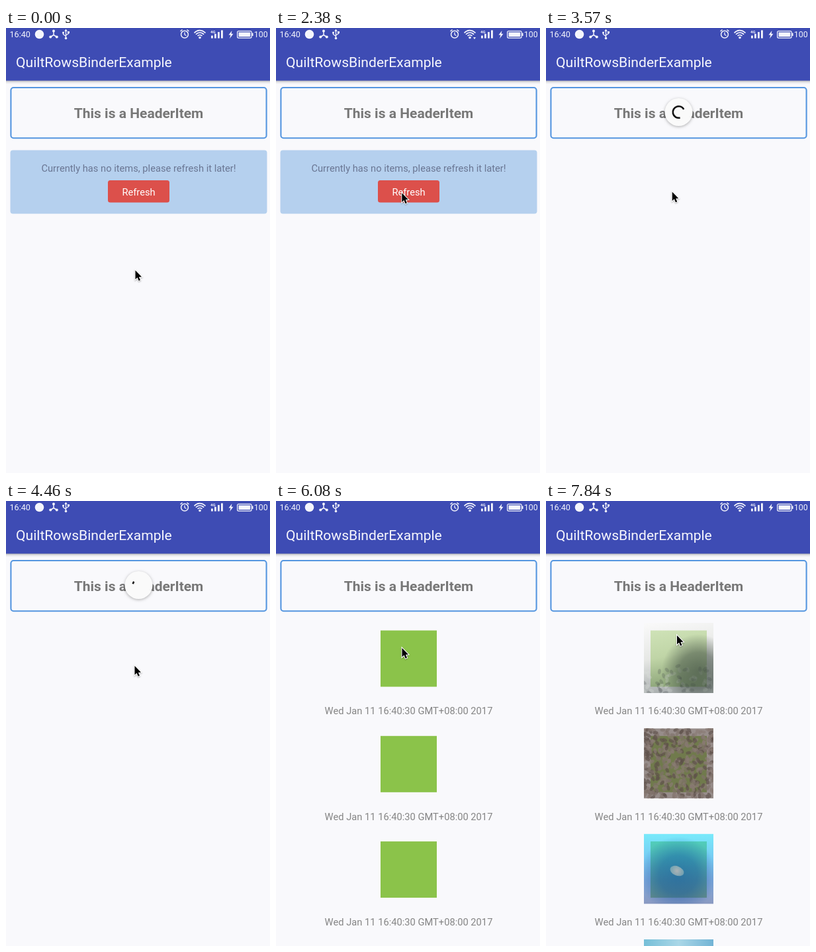
An HTML page with a canvas that plays this animation: 399x672 px, repeating every 7.99 s.

```html
<!DOCTYPE html>
<html lang="en">
<head>
<meta charset="utf-8">
<title>List refresh</title>
<style>
html, body { margin: 0; width: 100%; height: 100%; overflow: hidden; background: #f9f9fc; }
canvas { display: block; width: 399px; height: 672px; }
</style>
</head>
<body>
<canvas id="stage"></canvas>
<script>
const W = 399, H = 672, MID = 200.5;
const LOOP = 7990, TICK = 148, LAST_TICK = 53;
const canvas = document.getElementById('stage');
const ratio = window.devicePixelRatio || 1;
canvas.width = W * ratio;
canvas.height = H * ratio;
const c = canvas.getContext('2d');

// Pointer stops; it glides from one to the next.
const stops = [
  { t: 0, x: 195.5, y: 366 },
  { t: 1040, x: 166.5, y: 284 },
  { t: 1184, x: 176, y: 259 },
  { t: 1630, x: 192, y: 251 },
  { t: 2220, x: 192, y: 251 },
  { t: 2664, x: 187, y: 246 },
  { t: 4440, x: 194.5, y: 249 },
  { t: 5772, x: 190.5, y: 222 },
  { t: 6220, x: 190.5, y: 222 },
  { t: 6956, x: 198, y: 185 },
  { t: 7696, x: 199, y: 183 },
  { t: 7844, x: 198, y: 203 }
];

const clamp = v => Math.max(0, Math.min(1, v));
const ramp = (t, a, b) => clamp((t - a) / (b - a));
const mix = (a, b, k) => a + (b - a) * k;
const ease = v => v < 0.5 ? 4 * v * v * v : 1 - Math.pow(2 - 2 * v, 3) / 2;

function random(seed) {
  return () => (seed = (seed * 16807) % 2147483647) / 2147483647;
}

function text(str, x, y, size, color, align = 'left', weight = 400) {
  c.font = `${weight} ${size}px Roboto, sans-serif`;
  c.textAlign = align;
  c.fillStyle = color;
  c.fillText(str, x, y);
}

function rect(x, y, w, h, color) {
  c.fillStyle = color;
  c.fillRect(x, y, w, h);
}

function roundRect(x, y, w, h, r) {
  c.beginPath();
  c.roundRect(x, y, w, h, r);
}

function oval(x, y, rx, ry, angle, color) {
  c.fillStyle = color;
  c.beginPath();
  c.ellipse(x, y, rx, ry, angle, 0, Math.PI * 2);
  c.fill();
}

const disc = (x, y, r, color) => oval(x, y, r, r, 0, color);

function arc(x, y, r, from, to, width) {
  c.lineWidth = width;
  c.beginPath();
  c.arc(x, y, r, from, to);
  c.stroke();
}

function trace(points) {
  c.beginPath();
  points.forEach(([x, y]) => c.lineTo(x, y));
}

function line(points, width = 1.3) {
  c.lineWidth = width;
  trace(points);
  c.stroke();
}

function poly(points, color) {
  c.fillStyle = color;
  trace(points);
  c.fill();
}

function group(draw, alpha = 1) {
  if (alpha <= 0) return;
  c.save();
  c.globalAlpha = alpha;
  draw();
  c.restore();
}

function stopsOf(g, colors) {
  colors.forEach((color, i) => g.addColorStop(i / (colors.length - 1), color));
  return g;
}

const linear = (x0, y0, x1, y1, ...colors) =>
  stopsOf(c.createLinearGradient(x0, y0, x1, y1), colors);
const radial = (x, y, r, ...colors) =>
  stopsOf(c.createRadialGradient(x, y, 0, x, y, r), colors);

function shadow(alpha, blur, dy) {
  c.shadowColor = `rgba(0,0,0,${alpha})`;
  c.shadowBlur = blur * ratio;
  c.shadowOffsetY = dy * ratio;
}

function statusBar(t) {
  const white = '#f4f5fc';
  text('16:40', 5.5, 14, 12.6, white);
  disc(50.5, 9.5, 6.8, white);
  c.strokeStyle = white;

  // Three-node glyph
  for (let i = 0; i < 3; i++) {
    const a = (i * 2 / 3 - 0.5) * Math.PI;
    const x = 72 + 5.5 * Math.cos(a), y = 10.5 + 6 * Math.sin(a);
    line([[72, 10.5], [x, y]], 1.5);
    disc(x, y, 2, white);
  }

  // USB
  line([[90.5, 3], [90.5, 15]]);
  line([[90.5, 12.5], [86.5, 9.5], [86.5, 6.5]]);
  line([[90.5, 11], [94.5, 8.5], [94.5, 6]]);
  poly([[88.3, 5], [90.5, 1.5], [92.7, 5]], white);
  disc(90.5, 15.5, 1.8, white);
  disc(86.5, 7, 1.5, white);
  rect(93, 5, 3, 3, white);

  // Alarm
  arc(270, 9.7, 5.4, 0, 7, 1.5);
  line([[270, 6.5], [270, 10], [272.5, 11.5]]);
  for (const side of [-1, 1]) {
    line([[270 + side * 6.5, 5], [270 + side * 3.5, 2.5]], 1.6);
  }

  // Wi-Fi with activity mark
  for (const r of [4.5, 8, 11.3]) arc(293, 15, r, -Math.PI * 0.77, -Math.PI * 0.23, 1.7);
  disc(293, 14.5, 1.8, white);
  if ((t + 2010) % 2170 < 290) poly([[298, 14], [302, 14], [300, 17]], white);

  // Signal
  text('4G', 309, 8, 6, white, 'left', 700);
  for (let i = 0; i < 4; i++) {
    const h = 4 + i * 2.7;
    rect(310 + i * 5, 15.5 - h, 2.8, h, white);
  }

  // Battery
  poly([[341.5, 4], [336.5, 10.5], [339.5, 10.5], [338, 16], [343.5, 8.8], [340.5, 8.8]], white);
  c.lineWidth = 1.2;
  roundRect(349.6, 4.6, 21.5, 10.5, 2);
  c.stroke();
  rect(351.5, 6.5, 17.7, 6.7, white);
  rect(371.7, 7.5, 1.8, 4.5, white);
  text('100', 374.8, 14, 12.4, white);
}

function appBar(t) {
  rect(0, 79, W, 6, linear(0, 79, 0, 85, 'rgba(0,0,0,.3)', 'rgba(0,0,0,.08)', 'rgba(0,0,0,0)'));
  rect(0, 0, W, 79.5, '#3e4cb4');
  statusBar(t);
  text('QuiltRowsBinderExample', 15, 58.7, 21.1, '#f7f7fd');
}

function header() {
  roundRect(7.4, 90, 386.2, 76.2, 4);
  c.strokeStyle = '#5596e0';
  c.lineWidth = 2.1;
  c.stroke();
  text('This is a HeaderItem', MID, 135.9, 21, '#777', 'center', 700);
}

function emptyPanel() {
  roundRect(6.5, 184.5, 388, 96, 4);
  c.fillStyle = '#b5d0ee';
  c.fill();
  text('Currently has no items, please refresh it later!', MID, 217, 14.7, '#6a7693', 'center');
  roundRect(154, 230, 93, 33.5, 3.5);
  c.fillStyle = '#dc504b';
  c.fill();
  text('Refresh', MID, 252.5, 14.7, '#fff', 'center');
}

const fill = color => rect(0, 0, 105, 106, color);

function speckle(seed, count, size, from, colors) {
  const rnd = random(seed);
  for (let i = 0; i < count; i++) {
    oval(rnd() * 105, mix(from, 106, rnd()), size, size * 0.6, rnd() * 3, colors[i % colors.length]);
  }
}

function rocks() {
  fill(linear(10, 0, 30, 106, '#f9f9f8', '#dcded8', '#7d8584'));
  speckle(7, 60, 4, 65, ['rgba(225,228,225,.4)', 'rgba(60,68,72,.35)']);
  fill(radial(82, 72, 55, '#3d4a40', 'rgba(61,74,64,.8)', 'rgba(61,74,64,0)'));
}

function beans() {
  fill('#63544e');
  speckle(41, 420, 4, 0, ['#8a7c75', '#5f504a', '#80726b']);
}

function water() {
  fill(linear(0, 0, 0, 106, '#34e2fa', '#30b4ee', '#3a7cc8', '#4f66a2'));
  fill(radial(52, 62, 58, 'rgba(5,75,160,.75)', 'rgba(5,75,160,.6)', 'rgba(5,75,160,0)'));
  oval(50, 56, 11, 7, 0.4, radial(50, 56, 11, '#f0d2c0', '#8fb4b8'));
}

function sky() {
  fill(linear(0, 0, 105, 0, '#2f9fc4', '#7fc4dc', '#2a8fc0'));
}

const photos = [rocks, beans, water, sky];

function list(t) {
  photos.forEach((photo, i) => {
    const y = i * 159.3;
    rect(158, 195.5 + y, 85, 85, '#8bc34a');
    group(() => {
      c.translate(148, 184 + y);
      c.beginPath();
      c.rect(0, 0, 105, 106);
      c.clip();
      photo();
    }, ramp(t, 7740, 7900));
    text('Wed Jan 11 16:40:30 GMT+08:00 2017', MID, 322.4 + y, 14.7, '#858585', 'center');
  });
}

function spinnerArc(t) {
  // The head runs ahead for half a cycle, then the tail catches up.
  const cycles = (t - 4440) / 1332;
  const n = Math.floor(cycles), p = cycles - n;
  const sweep = 272, minArc = 24, drift = 306;
  const base = 204 + n * sweep + cycles * drift;
  const head = base + sweep * ease(clamp(p * 2)) + minArc / 2;
  const tail = base + sweep * ease(clamp(p * 2 - 1)) - minArc / 2;
  c.strokeStyle = '#111';
  arc(0, 0, 8.8, tail * Math.PI / 180, head * Math.PI / 180, 2.6);
}

function spinner(t) {
  const scale = ramp(t, 2880, 3270) * (1 - ramp(t, 5850, 6000));
  if (scale <= 0) return;
  group(() => {
    c.translate(MID, 127);
    c.scale(scale, scale);
    shadow(0.3, 4, 1.2);
    disc(0, 0, 21, '#fafafa');
    shadow(0, 0, 0);
    if (t > 3270) spinnerArc(t);
  });
}

function pointer(t) {
  const last = stops.length - 1;
  const i = Math.min(last - 1, stops.filter(s => s.t <= t).length - 1);
  const a = stops[i], b = stops[i + 1];
  const k = ramp(t, a.t, b.t);
  group(() => {
    c.translate(mix(a.x, b.x, k), mix(a.y, b.y, k));
    shadow(0.3, 2, 1);
    trace([[0, 0], [0, 13.6], [3.1, 10.7], [5.2, 15.8], [7.5, 14.8], [5.4, 9.9], [9.5, 9.7]]);
    c.closePath();
    c.lineWidth = 2;
    c.strokeStyle = '#fff';
    c.stroke();
    shadow(0, 0, 0);
    c.fillStyle = '#000';
    c.fill();
  });
}

function draw(now) {
  const t = TICK * Math.min(LAST_TICK, Math.floor((now % LOOP + 6) / TICK));
  c.setTransform(ratio, 0, 0, ratio, 0, 0);
  rect(0, 0, W, H, '#f9f9fc');
  header();
  group(emptyPanel, 1 - ramp(t, 2860, 2982));
  group(() => list(t), ramp(t, 5850, 5970));
  spinner(t);
  appBar(t);
  pointer(t);
}

let start;
function tick(now) {
  start ??= now;
  draw(now - start);
  requestAnimationFrame(tick);
}
draw(0);
requestAnimationFrame(tick);
</script>
</body>
</html>
```
